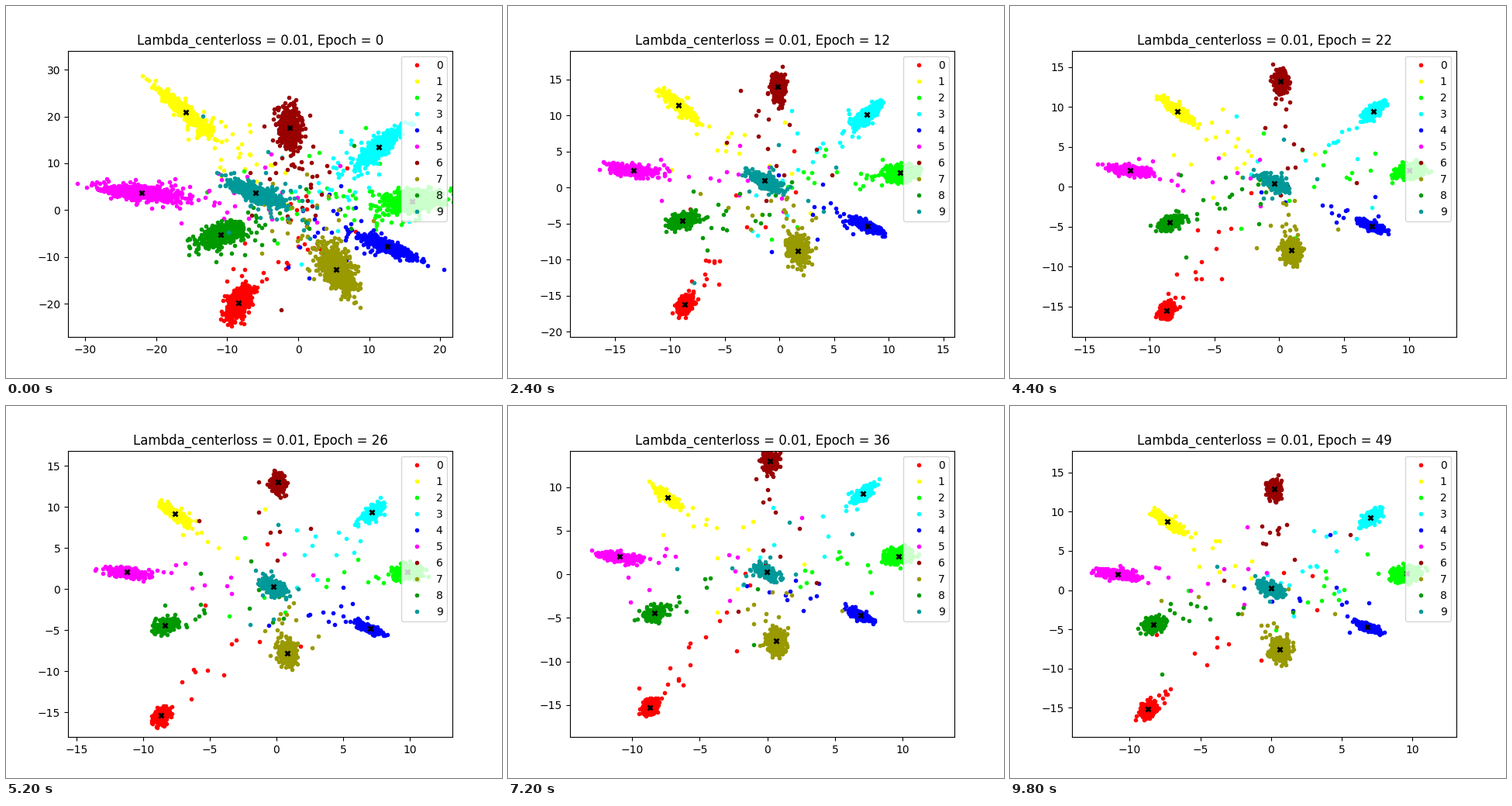
These frames come from a looping animation (640 by 480 pixels, 10 s). A matplotlib script:

```python
import numpy as np
import matplotlib.pyplot as plt
from matplotlib.animation import FuncAnimation

EPOCHS, STEP = 50, 200
LEFT, RIGHT, TOP, BOTTOM = 80.0, 576.0, 57.6, 427.2   # axes box in pixels
COLORS = ["#ff0000", "#ffff00", "#00ff00", "#00ffff", "#0000ff",
          "#ff00ff", "#990000", "#999900", "#009900", "#009999"]

# class centres before and after training, in data units
START = np.array([(-8.4, -19.8), (-15.8, 20.9), (16, 1.9), (11.4, 13.5), (12.6, -7.8),
                  (-22.1, 3.7), (-1.2, 17.6), (5.4, -12.7), (-10.9, -5.3), (-6, 3.7)])
SETTLED = np.array([(-8.7, -15.2), (-7.3, 8.7), (9.6, 2.1), (7, 9.2), (6.8, -4.7),
                    (-10.8, 2), (0.2, 12.9), (0.6, -7.6), (-8.3, -4.4), (0, 0.2)])
# half length and half width of each cloud at the start, in pixels
LENGTH = np.array([27, 54, 44, 40, 42, 62, 32, 38, 36, 42])
WIDTH = np.array([14, 9, 16, 12, 8, 10, 15, 20, 14, 12])

# axis limits at a few epochs
KEY_EPOCHS = [0, 6, 18, 26, 36, 43, 49]
LIMITS = [[-32.42, -21.93, -16.35, -15.64, -14.58, -13.19, -14.08],
          [21.72, 17.89, 14.14, 13.20, 13.81, 13.43, 13.10],
          [-27.14, -21.87, -19.61, -18.04, -18.66, -16.51, -18.78],
          [34.07, 20.76, 17.22, 16.88, 14.17, 15.91, 17.81]]
FLARE_CLASS, FLARE_EPOCH = 2, 43


def to_pixels(p, lim):
    x0, x1, y0, y1 = lim
    return np.column_stack([LEFT + (p[:, 0] - x0) / (x1 - x0) * (RIGHT - LEFT),
                            TOP + (y1 - p[:, 1]) / (y1 - y0) * (BOTTOM - TOP)])


def to_data(p, lim):
    x0, x1, y0, y1 = lim
    return (x0 + (p[:, 0] - LEFT) / (RIGHT - LEFT) * (x1 - x0),
            y1 - (p[:, 1] - TOP) / (BOTTOM - TOP) * (y1 - y0))


def blob(rng, centre, axis, length, width):
    """Dense cloud stretched along the axis."""
    axis = axis / np.hypot(*axis)
    normal = np.array([-axis[1], axis[0]])
    count = int(170 + 0.6 * length * width)
    u = rng.normal(0, 1 / 2.3, (count, 2))
    return centre + u[:, :1] * length * axis + u[:, 1:] * width * normal


def strays(rng, start, origin, centres, count, noise):
    """Loose points drifting to the origin and a little towards other classes."""
    other = centres[rng.integers(0, len(centres), count)]
    goal = origin + (other - origin) * rng.random((count, 1)) ** 2
    f = rng.random((count, 1)) ** 1.5
    return start + (goal - start) * f + rng.normal(0, 1, (count, 2)) * noise * (0.5 + f)


fig, ax = plt.subplots(figsize=(6.4, 4.8), dpi=100)
dots = [ax.plot([], [], ".", c=c, label=str(i))[0] for i, c in enumerate(COLORS)]
crosses, = ax.plot([], [], "kx", mew=2, ms=4)
ax.legend(handles=dots, loc="upper right")


def update(epoch):
    rng = np.random.default_rng(100 + epoch)
    loose = np.exp(-epoch / 8)                         # 1 untrained, 0 settled
    flare = np.exp(-((epoch - FLARE_EPOCH) / 1.2) ** 2)

    lim = [np.interp(epoch, KEY_EPOCHS, row) for row in LIMITS]
    lim[1] += 9.8 * flare
    centres = SETTLED + (START - SETTLED) * loose
    centres[FLARE_CLASS] += np.array([5.6, 4.4]) * flare
    length = LENGTH * (0.45 + 0.55 * loose)
    length[FLARE_CLASS] *= 1 + 2.7 * flare
    width = WIDTH * (0.65 + 0.35 * loose)

    origin = to_pixels(np.zeros((1, 2)), lim)[0]
    mids = to_pixels(centres, lim)
    axes = to_pixels(centres + 0.15 * START, lim) - origin
    count, noise = int(18 + 34 * loose), 9 + 9 * loose
    for line, mid, axis, l, w in zip(dots, mids, axes, length, width):
        points = np.vstack([blob(rng, mid, axis, l, w),
                            strays(rng, mid, origin, mids, count, noise)])
        line.set_data(*to_data(points, lim))
    crosses.set_data(centres[:, 0], centres[:, 1])
    ax.set_xlim(lim[:2])
    ax.set_ylim(lim[2:])
    ax.set_title(f"Lambda_centerloss = 0.01, Epoch = {epoch}")
    return [*dots, crosses]


anim = FuncAnimation(fig, update, frames=EPOCHS, interval=STEP,
                     repeat=True, repeat_delay=0, blit=False)
plt.show()
```
